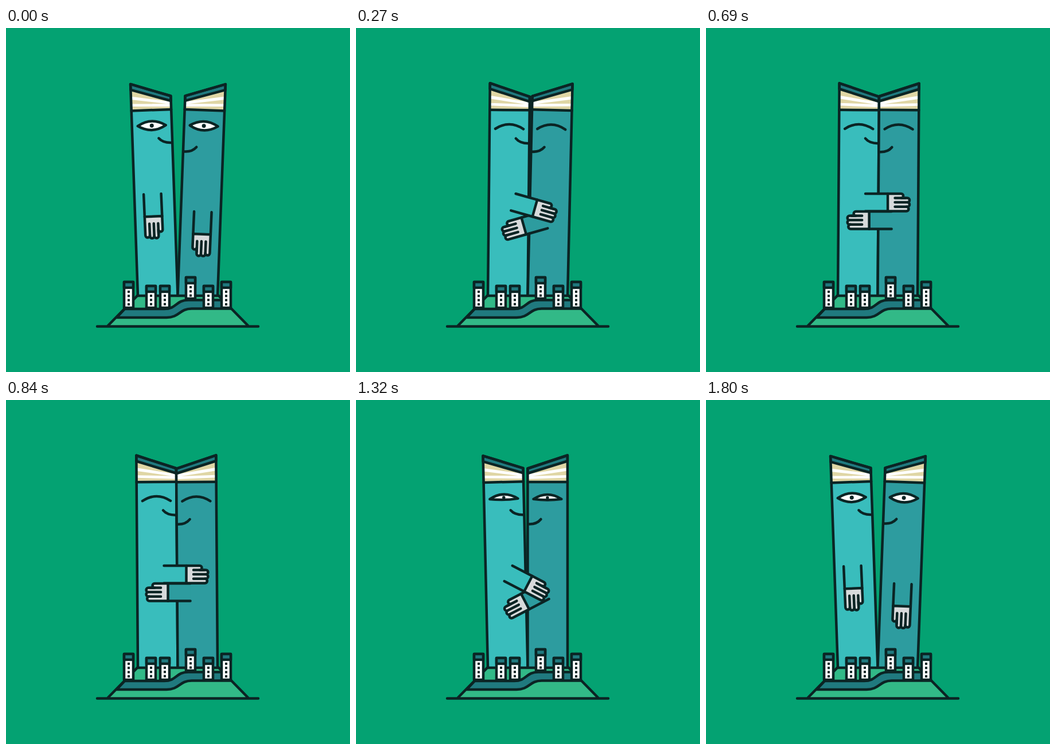
Animation of 600 by 600 pixels, one loop 1830 ms. Source, as an HTML page:

```html
<!DOCTYPE html>
<html lang="en">
<head>
<meta charset="utf-8">
<title>Hugging towers</title>
<style>
  html, body { margin: 0; width: 100%; height: 100%; overflow: hidden; background: #04a272; }
  svg { display: block; width: 100vw; height: 100vh; }
  .ink { stroke: #0b2424; stroke-width: 4.5; stroke-linecap: round; stroke-linejoin: round; }
  .line { fill: none; }
  .left { fill: #39bdbc; }
  .right { fill: #2d9c9f; }
  .cover { fill: #207a7f; }
  .land { fill: #32b987; }
  .hand { fill: #d7dadb; }
  .page { fill: #dfd6a5; }
  .white { fill: #fff; }
  .dark { fill: #0b2424; }
</style>
</head>
<body>
<svg viewBox="0 0 600 600">
  <defs>
    <clipPath id="above"><path d="M0 0H600V467H0Z"/></clipPath>
    <!-- cover and pages of the left tower; mirrored for the right one -->
    <g id="roof">
      <path class="page" d="M230 96.5L299.5 119.5V143.5H230Z"/>
      <path class="white" d="M230 118L299.5 129.5V134L230 123.5ZM230 131L299.5 133V138L230 135.5Z"/>
      <path class="cover ink" d="M230 96.5L299.5 119.5V128L230 106.5Z"/>
      <path class="line ink" d="M230 143H299.5"/>
    </g>
    <g id="palm">
      <path class="hand ink" d="M0 39V62.3a3.75 3.75 0 0 1-7.5 0V73.2a3.8 3.8 0 0 1-7.6 0a3.8 3.8 0 0 1-7.6 0V71.5a3.9 3.9 0 0 1-7.8 0V39Z"/>
      <path class="line ink" d="M-7.5 51.5V70M-15.1 51.5V73M-22.7 51.5V73M0 0V39M-30.5 0V39"/>
    </g>
  </defs>

  <path class="land" d="M178 520L229 467H371L422 520Z"/>
  <path class="cover ink" d="M207 490H276C298 490 296 474.5 318 474.5H377L392 489.5H324C302 489.5 303 505 280 505H193Z"/>
  <path class="line ink" d="M178 519L229 467M371 467L422 519M159 520.5H440"/>

  <g clip-path="url(#above)">
    <g id="towerL">
      <path class="left" d="M230 96.5L299.5 119.5V475H230Z"/>
      <use href="#roof"/>
      <path class="line ink" d="M230 475V96.5L299.5 119.5V475"/>
      <path class="line ink" d="M276 192.5Q283 201 298 201"/>
      <g transform="translate(264.6 170)"><path class="lid white ink"/><circle class="pupil dark"/></g>
    </g>
    <g id="towerR">
      <path class="right" d="M369 96.5L299.5 119.5V475H369Z"/>
      <use href="#roof" transform="matrix(-1 0 0 1 599 0)"/>
      <path class="line ink" d="M369 475V96.5L299.5 119.5V475"/>
      <path class="line ink" d="M301.5 216.5Q315 217 322.5 208"/>
      <g transform="translate(334 170.5)"><path class="lid white ink"/><circle class="pupil dark"/></g>
    </g>
  </g>
  <path class="line ink" d="M229 467H371"/>

  <g id="armR"><path class="right" d="M0 0V39H-30.5V0Z"/><use href="#palm"/></g>
  <g id="armL"><path class="left" d="M0 0V39H-30.5V0Z"/><use href="#palm"/></g>
  <g id="houses"></g>
</svg>
<script>
const LOOP = 1830, STEP = 30, BASE = 467;
const $ = id => document.getElementById(id);
const lids = document.querySelectorAll('.lid');
const pupils = document.querySelectorAll('.pupil');

// centre x, top, bottom, number of windows
const houses = [
  [214, 443, 488, 4], [253, 450, 488, 3], [277, 450, 488, 3],
  [322, 435, 472, 3], [353, 450, 488, 3], [384, 443, 488, 4]
];
$('houses').innerHTML = houses.map(([x, top, end, n]) => {
  let s = `<path class="white ink" d="M${x - 8} ${top}h16V${end}h-16Z"/>` +
    `<path class="cover ink" d="M${x - 8} ${top}h16v10h-16Z"/>`;
  for (let i = 0; i < n; i++)
    s += `<rect class="dark" x="${x - 2}" y="${top + 15 + i * 7.3}" width="4" height="4"/>`;
  return s;
}).join('');

const mix = (a, b, k) => a + (b - a) * k;

function ease(t, from, to) {
  const u = Math.min(1, Math.max(0, (t - from) / (to - from)));
  return (1 - Math.cos(Math.PI * u)) / 2;
}

function lean(id, x, angle) {
  $(id).setAttribute('transform', `rotate(${angle} ${x} ${BASE})`);
}

function swing(id, x, y, tilt, angle, side) {
  const px = x + (BASE - y) * Math.sin(tilt * Math.PI / 180);
  $(id).setAttribute('transform', `translate(${px} ${y}) scale(${side} 1) rotate(${-angle})`);
}

function draw(t) {
  const hug = ease(t, 0, 375) - ease(t, 1110, 1665);
  const sway = mix(1.15, -1, ease(t, 450, 1050));
  const tiltL = mix(-2, sway, hug);
  const tiltR = mix(2.15, sway, hug);
  const arm = mix(2.5, 90, hug);
  const open = 1 - ease(t, 30, 180) + ease(t, 1200, 1410);

  lean('towerL', 264.7, tiltL);
  lean('towerR', 334.3, tiltR);
  swing('armL', 276.8, 289, tiltL, arm, 1);
  swing('armR', 322.6, 320, tiltR, arm, -1);

  const end = mix(6, 0, open), top = mix(-10, -15.5, open), low = mix(-10, 15.5, open);
  lids.forEach(e => e.setAttribute('d', `M-24.5 ${end}Q0 ${top} 24.5 ${end}Q0 ${low} -24.5 ${end}Z`));
  pupils.forEach(e => e.setAttribute('r', 3.5 * Math.sqrt(Math.max(0, open))));
}

const start = performance.now();
function tick() {
  const t = (performance.now() - start) % LOOP;
  draw(Math.floor(t / STEP) * STEP);
  requestAnimationFrame(tick);
}
draw(0);
requestAnimationFrame(tick);
</script>
</body>
</html>
```
